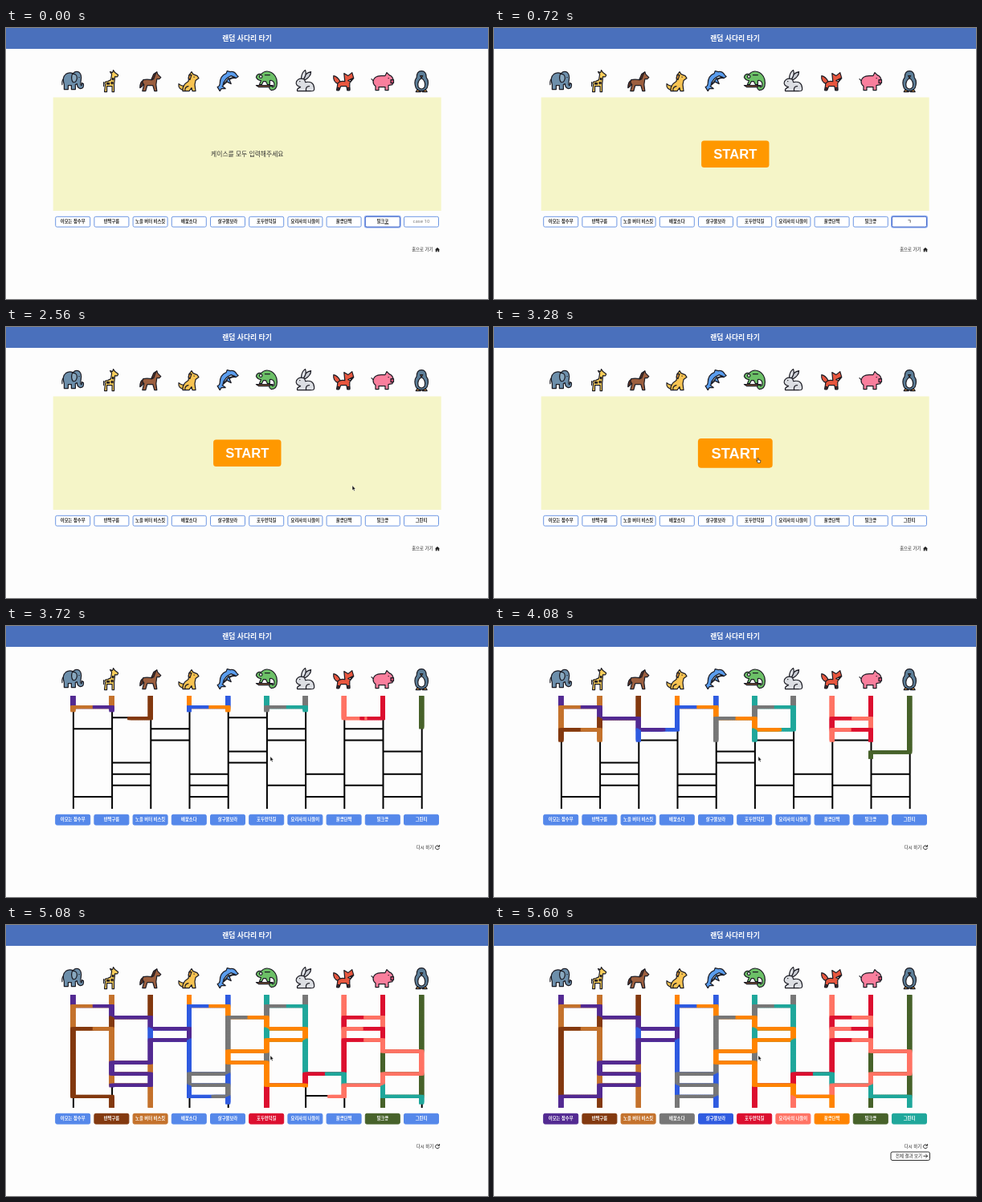
Animation of 600x338 px, one loop 5.64 s. Source, as an HTML page with a canvas:

```html
<!DOCTYPE html>
<html lang="ko">
<head>
<meta charset="utf-8">
<style>
html, body { margin: 0; width: 100%; height: 100%; overflow: hidden; background: #fdfdfd }
svg, canvas { position: absolute; left: 0; top: 0; width: 600px; height: 338px }
text { font: 500 5.4px "Noto Sans CJK KR", "Noto Sans CJK", "Noto Sans", sans-serif; text-anchor: middle; fill: #222 }
.name { font-weight: 700; font-size: 5.3px }
.empty { font: 6px "Noto Sans", sans-serif }
.animal path { stroke: #1c1c24; stroke-width: 1.2; stroke-linejoin: round; stroke-linecap: round }
.line { fill: none; stroke: #333; stroke-linecap: round; stroke-linejoin: round }
</style>
</head>
<body>
<svg id="scene" viewBox="0 0 600 338"></svg>
<canvas id="trails"></canvas>
<svg viewBox="0 0 600 338">
  <g id="pointer">
    <path id="hand" d="M-1 -2.5V1L-2.2 .2L-.6 3.2H2.4L3 .2L.2 -.3V-2.5Z" fill="#fff" stroke="#222" stroke-width=".7"/>
    <path id="arrow" d="M0 -3.5V2.3L1.3 1.2L2.3 3.2L3.2 2.8L2.3 .8H4Z" fill="#111" stroke="#fff" stroke-width=".4"/>
  </g>
</svg>
<script>
const LOOP = 5640, LADDER = 3440, RUN = 3478, UNIT = 86.3, RUNG = 1.5;
const TOP = 87, BOTTOM = 228, ROW = 14.1;
const colX = i => 83.4 + 48.2 * i;
const rowY = k => TOP + ROW * k;

const names = ['이모는 잠수부', '반짝구름', '노을 버터 비스킷', '배꽃소다', '살구물보라',
  '호두언덕길', '요리사의 나들이', '꿀콩단짝', '밀크콩', '그린티'];
const colors = ['#532a92', '#c4722c', '#83390f', '#ff8400', '#2f5be0',
  '#1fa79b', '#777', '#ff7364', '#dc0f2f', '#47622a'];
// rows of the rungs to the right of each column
const rungs = [[1, 3, 9], [2, 6, 7, 8], [3, 4], [1, 7, 8, 9], [2, 5, 6],
  [1, 3, 4, 8], [7, 9], [2, 3, 4, 8], [5, 7, 9]];

// fill colour and outline pairs, in a 28 px box
const animals = [
  ['none', 'M2 11Q0 13 .5 18', '#6d8fab', 'M3 24V18Q0 9 5 5Q9 2 14 4Q18 0 22 3Q25 6 24 12Q23 18 24 19Q25 20 25 16L27 17Q28 23 23 23Q19 22 19 17L17 18V24H12V19H8V24Z',
    '#8aa9c0', 'M13 5Q19 4 19 10Q18 16 14 15Q11 11 13 5Z', 'none', 'M21.5 9h.3'],
  ['#f8cd5a', 'M5 27L6 18Q4 14 9 14L13 12L14 5L12 2L15 3L16 0L18 3L22 6Q22 9 18 8L17 18V27H14.5V20H8V27Z',
    '#b9692d', 'M15 10h1.2v2h-1.2ZM8 16h3v1.5h-3ZM13.5 15h2v2h-2Z', 'none', 'M4 15V20'],
  ['#5b3325', 'M5 13Q1 14 1 22Q4 21 6 16Z',
    '#9c5f3f', 'M4 26L6 18Q3 16 5 12Q9 11 16 12L19 5L22 2L23 5L27 9L25 11L22 11L21 18L22 26H19L17 19H10L8 26Z',
    '#5b3325', 'M15 12L18 5L21 3L18 11Z'],
  ['#f7c352', 'M8 25Q0 24 1 17Q4 20 8 20Z',
    '#f7c352', 'M6 26Q5 19 13 14L14 6L17 2L19 5L24 7L26 10L22 13L21 18L22 26H18L17 22L14 26Z',
    '#e59a35', 'M14 6L17 6L15 12L13 10Z', 'none', 'M20 8.5h.3M9 26Q8 21 13 20'],
  ['#5a9dee', 'M4 26L1 21Q4 20 4 17Q4 7 12 4L13 1L17 2Q22 1 25 6L27 8L24 10Q18 9 15 13Q10 17 7 20L11 23L6 23Z',
    '#d9ecfa', 'M23 9Q16 9 12 14L8 18Q10 10 18 7Z', '#5a9dee', 'M15 10L18 17L12 14Z'],
  ['#a5663c', 'M1 19H22L20 21H4Z',
    '#6cc067', 'M1 9Q2 4 7 5Q13 -1 20 3Q27 7 27 16Q27 25 20 25Q16 23 18 20Q21 19 21 21Q25 21 23 15Q21 12 18 13L18 18H15L13 14H10L8 18H5L7 13Q3 13 1 9Z',
    '#fff', 'M5 8a1.8 1.8 0 1 0 3.6 0a1.8 1.8 0 1 0-3.6 0', 'none', 'M12 6L18 6'],
  ['#c9ccd3', 'M11 11Q14 3 21 2Q21 8 14 12Z', '#e1e3e8', 'M9 11Q9 3 14 0Q16 5 12 11Z',
    '#dcdee3', 'M4 26Q3 23 8 21Q1 19 3 14Q6 9 12 11Q14 13 14 15Q24 13 25 22Q26 27 20 26Z',
    'none', 'M7 14h.3M15 26Q14 20 19 20'],
  ['#e8573f', 'M7 17Q0 15 1 7Q6 8 9 14Z',
    '#e8573f', 'M6 17Q8 13 15 14L14 4L19 7L24 3L26 10L21 16L21 25H18L17 20H10L8 25H5Z',
    '#fff', 'M19 13L25 10L22 14Z', '#5a3434', 'M5.5 22H8L7.5 25H5ZM18 22H21V25H18Z'],
  ['#f97f9d', 'M2 14Q3 7 12 7L17 7L19 3L22 6Q27 8 27 13L26 18L21 19V25H17V21H9V25H5V20Q2 18 2 14Z',
    '#d85578', 'M24 12H27.5V16H24Z', 'none', 'M21 10h.3M2 13L0 11'],
  ['#f5a53c', 'M9 24L7 27H13ZM19 24L21 27H15Z',
    '#5d7f99', 'M7 22Q4 14 8 9Q8 1 14 1Q20 1 20 9Q24 14 21 22Q18 26 14 26Q10 26 7 22Z',
    '#fff', 'M14 10Q20 14 18 21Q14 26 10 21Q8 14 14 10Z', '#f5a53c', 'M12.5 7h3l-1.5 3Z']
];

const $ = id => document.getElementById(id);
const label = (x, y, text, attrs = '') => `<text x="${x}" y="${y}" ${attrs}>${text}</text>`;
const animal = (parts, i) => {
  let out = '';
  for (let n = 0; n < parts.length; n += 2) out += `<path fill="${parts[n]}" d="${parts[n + 1]}"/>`;
  return `<g class="animal" transform="translate(${colX(i) - 14} 52.6)">${out}</g>`;
};
const box = (name, i) => `<g transform="translate(${colX(i) - .2} 241.7)">
  <rect id="ring${i}" x="-23" y="-7.9" width="46" height="15.8" rx="3" fill="#8fadf0"/>
  <rect id="box${i}" x="-21.5" y="-6.4" width="43" height="12.8" rx="1.8"/>
  <rect id="mark${i}" x="2.4" y="2.5" width="5.2" height=".7" fill="#222"/>
  <text id="name${i}" class="name" y="1.6">${name}</text></g>`;
const rail = (_, i) => `M${colX(i) + .5} ${TOP}V${BOTTOM}`;
const steps = (rows, i) => rows.map(k => `M${colX(i)} ${rowY(k) - 1}H${colX(i + 1)}`).join('');

$('scene').innerHTML = `
  <rect width="600" height="26" fill="#4a70bc"/>
  ${label(300, 16.2, '랜덤 사다리 타기', 'style="font-size:8.8px;font-weight:700;fill:#fff"')}
  ${animals.map(animal).join('')}
  <g id="form">
    <rect x="58.7" y="86.5" width="483" height="141.5" fill="#f5f5c8"/>
    ${label(300.3, 160.2, '케이스를 모두 입력해주세요', 'id="hint" style="font-size:7.8px;fill:#333"')}
    <g id="start">
      <rect x="-42.2" y="-16.7" width="84.4" height="33.4" rx="3.5" fill="#ff9800"/>
      ${label(0, 6, 'START', `style="font:bold 16.6px 'Liberation Sans',Arial,sans-serif;fill:#fff"`)}
    </g>
    ${label(518.3, 278.4, '홈으로 가기')}
    <path d="M534 276.6L537 273.7L540 276.6H539.2V279.2H537.6V277.4H536.4V279.2H534.8V276.6Z" fill="#222"/>
  </g>
  <g id="ladder">
    <path d="${names.map(rail).join('')}${rungs.map(steps).join('')}" fill="none" stroke="#000" stroke-width="2"/>
    ${label(521.5, 278.4, '다시 하기')}
    <path class="line" d="M539 274.7A2.5 2.5 0 1 0 539.4 277.2M539.6 273.4V275.2H537.6"/>
  </g>
  ${names.map(box).join('')}
  <g id="results">
    <rect x="494" y="283" width="48.5" height="10.5" rx="2" fill="#fff" stroke="#333"/>
    ${label(516.5, 290.2, '전체 결과 보기')}
    <path class="line" d="M534.8 288.2H539.6M537.6 286.2L539.6 288.2L537.6 290.2"/>
  </g>`;

// each route is a list of corners with the time, in units, they are reached
const routes = names.map((_, start) => {
  let col = start, time = 0;
  const points = [{ time, x: colX(col), y: TOP }];
  const add = (dt, k) => points.push({ time: time += dt, x: colX(col), y: rowY(k) });
  for (let k = 1; k <= 10; k++) {
    add(1, k);
    const side = rungs[col]?.includes(k) ? 1 : rungs[col - 1]?.includes(k) ? -1 : 0;
    if (side) { col += side; add(RUNG, k); }
  }
  return { points, end: col, time };
});
const winner = names.map((_, i) => routes.findIndex(r => r.end === i));

const at = (points, time) => {
  const n = points.findIndex(p => p.time >= time);
  if (n < 1) return points[n < 0 ? points.length - 1 : 0];
  const a = points[n - 1], b = points[n], f = (time - a.time) / (b.time - a.time);
  return { x: a.x + (b.x - a.x) * f, y: a.y + (b.y - a.y) * f };
};

const canvas = $('trails'), ctx = canvas.getContext('2d'), dpr = window.devicePixelRatio || 1;
canvas.width = 600 * dpr;
canvas.height = 338 * dpr;
ctx.scale(dpr, dpr);
ctx.beginPath();
ctx.rect(0, TOP, 600, BOTTOM - TOP);
ctx.clip();

// later brush marks cover earlier ones where two routes share a rung
function drawTrails(now) {
  ctx.clearRect(0, 0, 600, 338);
  for (let time = 0; time <= now; time += .05)
    routes.forEach((route, i) => {
      if (time > route.time + .05) return;
      const p = at(route.points, time);
      ctx.fillStyle = colors[i];
      ctx.fillRect(p.x - 3, p.y - 2, 6, 4);
    });
}

// typing in the last two boxes, by box number
const typed = {
  8: [[0, '밀크코'], [120, '밀크콩']],
  9: [[0, ''], [720, 'ㄱ'], [840, '그'], [1000, '그ㄹ'], [1120, '그리'],
    [1240, '그린'], [1360, '그린ㅌ'], [1480, '그린티']]
};
const textAt = (i, t) => typed[i] ? typed[i].filter(s => s[0] <= t).pop()[1] : names[i];

const clamp = v => Math.min(1, Math.max(0, v));
const ease = v => (v = clamp(v), v * v * (3 - 2 * v));
const show = (id, on) => $(id).style.display = on ? '' : 'none';

function drawBoxes(t, playing, now) {
  const focus = t < 560 ? 8 : t < 2000 ? 9 : -1;
  names.forEach((_, i) => {
    const text = textAt(i, t), done = now >= routes[winner[i]].time;
    const fill = playing ? (done ? colors[winner[i]] : '#5588ea') : '#fff';
    const rect = $('box' + i), name = $('name' + i);
    rect.style.fill = fill;
    rect.style.stroke = playing ? fill : i === focus ? '#4468c8' : '#6d97e3';
    name.textContent = text || 'case 10';
    name.setAttribute('class', text ? 'name' : 'empty');
    name.style.fill = playing ? '#fff' : text ? '#222' : '#777';
    show('ring' + i, i === focus);
    show('mark' + i, i === focus && text.length === 3 && (i === 9 ? t < 1760 : t < 400));
  });
}

function render(t) {
  const playing = t >= LADDER, now = (t - RUN) / UNIT;
  show('form', !playing);
  show('ladder', playing);
  show('hint', t < 720);
  show('start', t >= 720);
  $('start').setAttribute('transform', `translate(300.3 157.3) scale(${1 + .1 * ease((t - 2750) / 200)})`);
  drawBoxes(t, playing, now);
  drawTrails(now);
  $('results').style.opacity = clamp((t - 5400) / 160);

  const move = ease((t - 2300) / 600);
  show('pointer', t >= 2300);
  show('hand', !playing && t >= 2750);
  show('arrow', playing || t < 2750);
  $('pointer').setAttribute('transform', `translate(${500 - 171 * move} ${225 - 58.8 * move})`);
}

const begin = performance.now();
function frame() {
  render((performance.now() - begin) % LOOP);
  requestAnimationFrame(frame);
}
frame();
</script>
</body>
</html>
```
